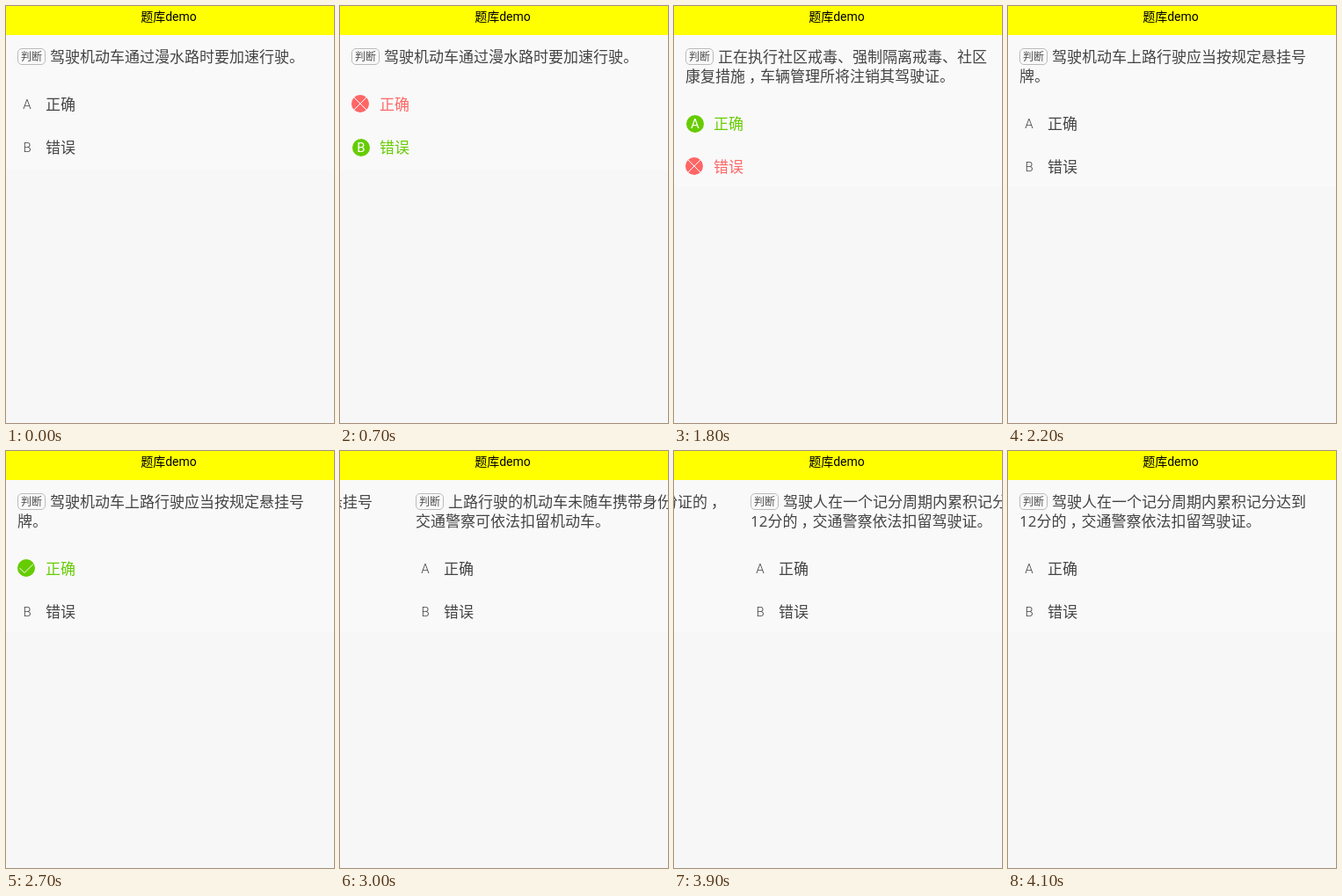
Write an HTML page that moves like this. It is 373 by 474 pixels and loops after 4200 ms.

```html
<!DOCTYPE html>
<html lang="zh-CN">
<head>
<meta charset="utf-8">
<title>题库demo</title>
<style>
  html, body { margin: 0; width: 100%; height: 100%; overflow: hidden; background: #f7f7f7; }
  svg { display: block; width: 100%; height: 100%; }
  text { font: 17px 'Open Sans', 'Noto Sans CJK SC', 'Noto Sans CJK JP', sans-serif; fill: #444; }
  .title { font: 14px Roboto, 'Noto Sans CJK SC', 'Noto Sans CJK JP', sans-serif; fill: #000; text-anchor: middle; }
  .badge { font-size: 12px; text-anchor: middle; fill: #505050; }
  .letter { font: 300 15px Roboto, sans-serif; text-anchor: middle; }
  .done .letter { font-weight: 400; fill: #fff; }
  .icon { fill: none; stroke: #fff; stroke-width: 1; }
</style>
</head>
<body>
<svg viewBox="0 0 373 474">
  <rect width="373" height="474" fill="#f7f7f7"/>
  <g id="pages"></g>
  <rect width="373" height="33" fill="#ff0"/>
  <text class="title" x="185" y="17">题库demo</text>
</svg>
<script>
const LOOP = 4200, TICK = 100, SLIDE = 300, PAGE = 375;
const GREEN = '#66cc00', RED = '#ff6666';

// marks: how options A and B look once answered; slide: when the next page comes in
const questions = [
  { lines: ['驾驶机动车通过漫水路时要加速行驶。'], marks: ['cross', 'letter'], answer: 700, slide: 807 },
  { lines: ['正在执行社区戒毒、强制隔离戒毒、社区', '康复措施，车辆管理所将注销其驾驶证。'], marks: ['letter', 'cross'], answer: 1800, slide: 1900 },
  { lines: ['驾驶机动车上路行驶应当按规定悬挂号', '牌。'], marks: ['tick', ''], answer: 2700, slide: 2849 },
  { lines: ['上路行驶的机动车未随车携带身份证的，', '交通警察可依法扣留机动车。'], marks: ['', 'tick'], answer: 3500, slide: 3750 },
  { lines: ['驾驶人在一个记分周期内累积记分达到', '12分的，交通警察依法扣留驾驶证。'], marks: ['', ''], answer: Infinity, slide: Infinity }
];

// Full-width commas sit in the middle of their cell
const centreCommas = s => s.replace(/，(.?)/g, (_, next) =>
  '<tspan dx="4">，</tspan>' + (next && `<tspan dx="-4">${next}</tspan>`));

const text = (x, y, s, attrs = '') => `<text x="${x}" y="${y}" ${attrs}>${s}</text>`;
const disc = (x, y, color) => `<circle cx="${x}" cy="${y}" r="10" fill="${color}"/>`;
const letterText = (letter, y) => text(24, y + 5, letter, 'class="letter"');

function markShape(mark, letter, y) {
  if (mark === 'letter') return disc(24, y, GREEN) + letterText(letter, y);
  const cross = mark === 'cross';
  const path = cross ? 'M-7-7L7 7M7-7L-7 7' : 'M-7.5 0L-2 5.5L8-4.5';
  return disc(23, y - 1, cross ? RED : GREEN) +
    `<path class="icon" transform="translate(23 ${y - 1})" d="${path}"/>`;
}

function option(i, y, mark) {
  const letter = 'AB'[i], label = ['正确', '错误'][i];
  const idle = letterText(letter, y) + text(45, y + 6, label);
  if (!mark) return idle;
  const color = mark === 'cross' ? RED : GREEN;
  return `<g class="idle">${idle}</g><g class="done">${markShape(mark, letter, y)}` +
    text(45, y + 6, label, `style="fill:${color}"`) + '</g>';
}

function page({ lines, marks }) {
  const extra = lines.length - 1, top = 112 + 22 * extra;
  return `<g class="page"><rect y="33" width="${PAGE}" height="${154 + 19 * extra}" fill="#f9f9f9"/>` +
    '<rect x="13.5" y="48.5" width="31" height="18" rx="4.5" fill="none" stroke="#bbb"/>' +
    text(29, 62, '判断', 'class="badge"') +
    lines.map((s, i) => text(i ? 13 : 50, 64 + 22 * i, centreCommas(s))).join('') +
    marks.map((m, i) => option(i, top + 49 * i, m)).join('') + '</g>';
}

const root = document.getElementById('pages');
root.innerHTML = questions.map(page).join('');
const pages = [...root.children];

const bezier = (a, b, u) => 3 * a * u * (1 - u) ** 2 + 3 * b * u * u * (1 - u) + u ** 3;

// Same curve as the CSS keyword "ease"
function ease(x) {
  if (x <= 0) return 0;
  if (x >= 1) return 1;
  let lo = 0, hi = 1;
  for (let i = 0; i < 24; i++) {
    const mid = (lo + hi) / 2;
    if (bezier(.25, .25, mid) < x) lo = mid; else hi = mid;
  }
  return bezier(.1, 1, lo);
}

function draw(t) {
  const scroll = questions.reduce((sum, q) => sum + ease((t - q.slide) / SLIDE), 0);
  pages.forEach((el, i) => {
    const x = Math.round((i - scroll) * PAGE);
    const answered = t >= questions[i].answer;
    el.setAttribute('transform', `translate(${x} 0)`);
    el.style.display = Math.abs(x) < PAGE ? '' : 'none';
    el.querySelectorAll('.idle').forEach(g => g.style.display = answered ? 'none' : '');
    el.querySelectorAll('.done').forEach(g => g.style.display = answered ? '' : 'none');
  });
}

// The picture advances in steps of one tick
const start = performance.now();
function frame() {
  const t = (performance.now() - start) % LOOP;
  draw(Math.floor(t / TICK) * TICK);
  requestAnimationFrame(frame);
}
frame();
</script>
</body>
</html>
```
